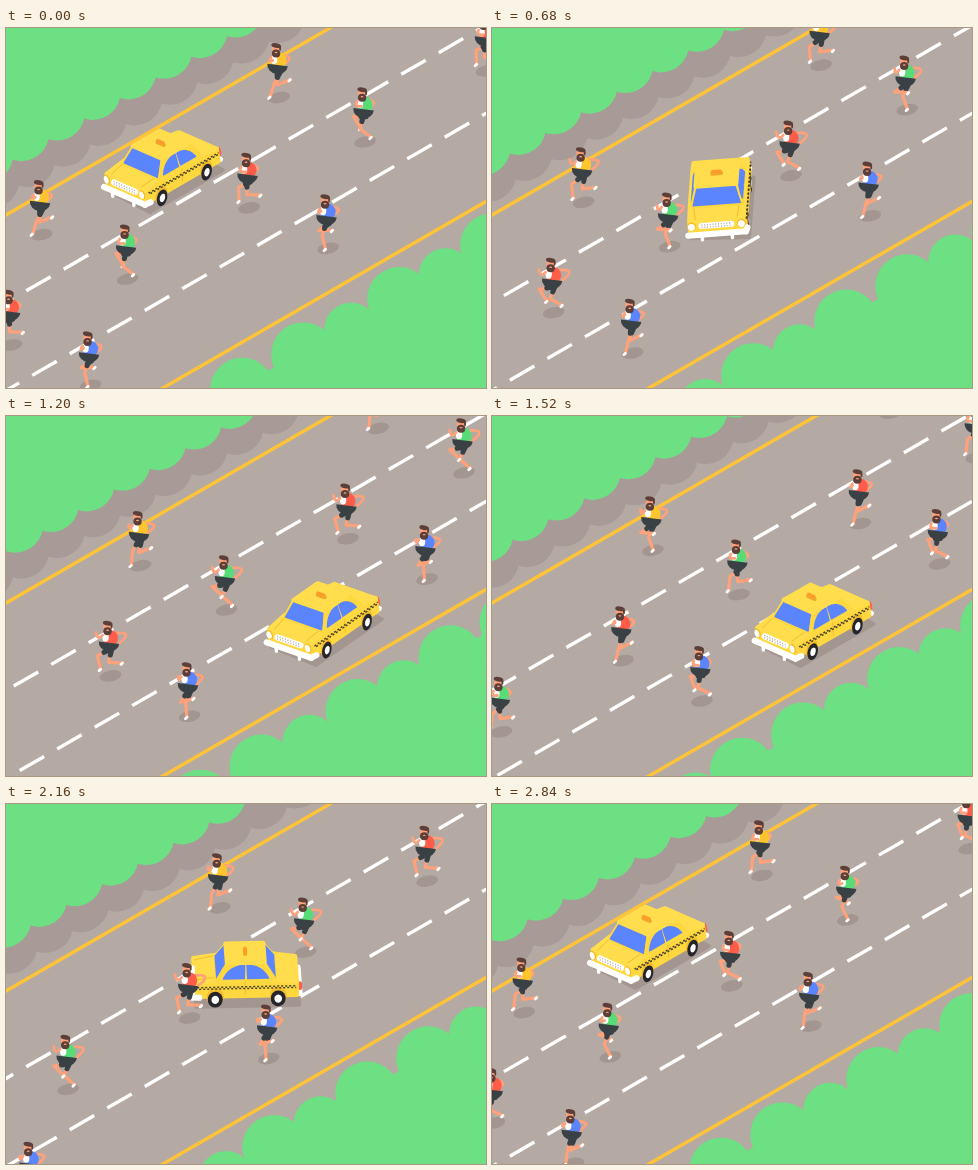
An HTML page with a canvas for the animation above (2.88 s loop, 480 px wide and 360 px high).

```html
<!DOCTYPE html>
<html lang="en">
<head>
<meta charset="utf-8">
<title>Taxi among runners</title>
<style>
  html, body { margin: 0; width: 100%; height: 100%; overflow: hidden; background: #b5a9a3; }
  canvas { display: block; width: 100vw; height: 100vh; }
</style>
</head>
<body>
<canvas id="stage" width="480" height="360"></canvas>
<script>
const ctx = document.getElementById('stage').getContext('2d');
const LOOP = 2880, TAU = Math.PI * 2;
const SLOPE = Math.tan(Math.PI / 6); // isometric ground
const C = {
  road: '#b5a9a3', shade: '#a89a96', bush: '#6ce083', line: '#ffc337', white: '#fff',
  taxi: '#ffd83f', taxiTop: '#ffdd4d', seam: '#f3bd2d', glass: '#5b84ff', dark: '#3a4145',
  skin: '#ffa17a', hair: '#5b3f38', orange: '#ff9a2b', red: '#ff5d49', check: '#4b4229'
};
const mod = (v, n) => ((v % n) + n) % n;
const mix = (a, b, k) => a + (b - a) * k;
const mixPoint = (p, q, k) => p.map((v, i) => mix(v, q[i], k));
const roadY = (x, c) => c - SLOPE * x;

function stroke(points, color, width, cap = 'round') {
  ctx.beginPath();
  points.forEach(p => ctx.lineTo(p[0], p[1]));
  ctx.strokeStyle = color;
  ctx.lineWidth = width;
  ctx.lineCap = cap;
  ctx.lineJoin = 'round';
  ctx.stroke();
}

function fill(points, color, round = 0) {
  if (round) stroke([...points, points[0], points[1]], color, round);
  ctx.beginPath();
  points.forEach(p => ctx.lineTo(p[0], p[1]));
  ctx.fillStyle = color;
  ctx.fill();
}

function oval(x, y, rx, ry, color, turn = 0, from = 0, to = TAU) {
  ctx.beginPath();
  ctx.ellipse(x, y, rx, ry, turn, from, to);
  ctx.fillStyle = color;
  ctx.fill();
}

// Road and bushes

function roadLine(c, color, phase) {
  const dashed = phase !== undefined, stretch = Math.hypot(1, SLOPE);
  const start = dashed ? mod(phase, 37.5) - 75 : -40;
  if (dashed) ctx.setLineDash([24.5 * stretch, 13 * stretch]);
  stroke([[start, roadY(start, c)], [560, roadY(560, c)]], color, 3.4, 'butt');
  ctx.setLineDash([]);
}

function bumps(x0, shift, period, c, r, color) {
  for (let x = mod(x0 + shift, period) - period; x < 760; x += period) oval(x, roadY(x, c), r, r, color);
}

function bank(c, edgeY, color) {
  fill([[-60, roadY(-60, c)], [560, roadY(560, c)], [560, edgeY], [-60, edgeY]], color);
}

function topBush(shift, dx, dy, color) {
  ctx.save();
  ctx.translate(dx, dy);
  bank(112, -400, color);
  bumps(15, shift, 250 / 7, 114, 28, color);
  ctx.restore();
}

function lowBush(shift) {
  const period = 250, crowns = [236, 297, 393];
  bank(494, 500, C.bush);
  crowns.forEach((x, i) => {
    const next = i < 2 ? crowns[i + 1] : crowns[0] + period;
    bumps(x, shift, period, 498, 32, C.bush);
    if (next - x > 70) bumps((x + next) / 2, shift, period, 501, 27, C.bush);
  });
}

// Runners

const runners = [
  { x: 270, c: 178, color: '#ffc52e', phase: 0.75 },
  { x: 356, c: 272, color: '#58dc77', phase: 0.25 },
  { x: 240, c: 271, color: C.red, phase: 0.5 },
  { x: 319, c: 357, color: C.glass, phase: 0 }
];

// The foot runs round an ellipse; the knee follows from the two bone lengths
function leg(hipX, step) {
  const a = step * Math.PI, hipY = 23, thigh = 12.5, shin = 14;
  const dx = 4 + 11.5 * Math.cos(a - 1.9) - hipX, dy = 39 + 10 * Math.cos(a + 0.3) - hipY;
  const d = Math.min(Math.hypot(dx, dy), thigh + shin - 0.1), dir = Math.atan2(dy, dx);
  const bend = Math.acos((thigh ** 2 + d ** 2 - shin ** 2) / (2 * thigh * d));
  const reach = (len, angle) => [hipX + len * Math.cos(angle), hipY + len * Math.sin(angle)];
  const knee = reach(thigh, dir + bend), foot = reach(d, dir);
  stroke([reach(0, 0), knee, foot], C.skin, 3.2);
  stroke([reach(0, 0), mixPoint(reach(0, 0), knee, 0.4)], C.dark, 5);
  stroke([foot, [foot[0] - 1.5, foot[1] + 1.5]], C.white, 2.8);
}

function arm(from, elbow, hand, color) {
  ctx.beginPath();
  ctx.moveTo(...from);
  ctx.quadraticCurveTo(...elbow, ...hand);
  ctx.strokeStyle = color;
  ctx.lineWidth = 2.8;
  ctx.lineCap = 'round';
  ctx.stroke();
}

function drawRunner(x, y, color, step) {
  const out = 0.5 - 0.5 * Math.cos((step - 0.4) * Math.PI);
  ctx.save();
  ctx.translate(x, y);
  oval(3, 47.5, 11, 5.5, '#a39590', -0.2);
  ctx.translate(0, -1.2 * Math.sin(step * Math.PI) ** 2);
  leg(4, step + 1);
  leg(1, step);
  arm([8, 6], mixPoint([16, 10], [27, 4], out), mixPoint([5, 14], [12, 16], out), C.skin);
  oval(3, 11, 7.5, 8, color);
  oval(-2, 10, 3.2, 4.5, C.white);
  oval(1.5, 15.5, 10.3, 9, C.dark, 0.12, 0, Math.PI);
  arm([-5, 8], mixPoint([-8, 13], [-10, 14], out), mixPoint([0, 13], [-12, 5], out), C.skin);
  oval(0, 0, 4.3, 5, C.skin);
  oval(0, 4, 4.2, 4, C.hair);
  oval(0, 3, 1.5, 0.7, C.skin);
  oval(0, -4, 4.8, 2.3, C.hair, 0.2);
  oval(4, -1.5, 1, 3, C.hair);
  ctx.restore();
}

// Taxi: a = forward, b = towards the near side, z = up

function taxiPose(t) {
  const half = LOOP / 2, k = (t % half) / half, away = t < half;
  const rise = v => 2 ** 1.7 * v ** 2.7;
  const ease = k < 0.5 ? rise(k) : 1 - rise(1 - k);
  const pos = away ? ease : 1 - ease;
  const swing = Math.sin(Math.PI * k) ** 3 * (away ? 43 : -43);
  return { x: 157 + 165 * pos, y: 151 + 66 * pos, turn: (45 + swing) * Math.PI / 180 };
}

function drawTaxi({ x, y, turn }) {
  const cos = Math.cos(turn), sin = Math.sin(turn), lean = 0.1;
  const at = ([a, b, z]) => {
    const side = b - z * lean, up = z + b * lean;
    return [x - a * cos + side * sin, y + (a * sin + side * cos) * SLOPE - up];
  };
  const face = (list, color, round) => fill(list.map(at), color, round);
  const line = (list, color, width, cap) => stroke(list.map(at), color, width, cap);
  const across = (a, b, z, color, width, cap) => line([[a, -b, z], [a, b, z]], color, width, cap);
  const disc = (place, r, color) => face(Array.from({ length: 20 }, (_, i) =>
    place(r * Math.cos(i / 20 * TAU), r * Math.sin(i / 20 * TAU))), color);
  const towardsViewer = list => {
    const [p, q, r] = list.map(at);
    return (q[0] - p[0]) * (r[1] - p[1]) < (q[1] - p[1]) * (r[0] - p[0]);
  };
  const dotted = (dash, offset, drawLine) => {
    ctx.setLineDash(dash);
    ctx.lineDashOffset = offset;
    drawLine();
    ctx.setLineDash([]);
  };

  const wide = 27, profile = [[51, 17], [27, 20], [-27, 20], [-51, 17]];
  const edge = b => profile.map(([a, z]) => [a, b, z]);
  const near = edge(wide), far = edge(-wide);

  face([[50, -wide, 0], [50, 31, -3], [-53, 31, -3], [-53, -wide, 0]], '#a39590', 4);
  across(-54, 28, 6, C.white, 5);
  line([[-54, 26, 15], [-54, 27, 11]], C.red, 4);

  // Lower body: front, near side, then the three top panels
  face([far[0], near[0], [51, 28, 5], [51, -wide, 5]], C.taxi, 4);
  face([...near, [-51, 28, 5], [51, 28, 5]], C.taxi, 4);
  for (let i = 0; i < 3; i++) face([near[i], near[i + 1], far[i + 1], far[i]], C.taxiTop, 4);
  for (const b of [-21, 21]) line([[50, b, 18], [29, b * 1.1, 21]], C.seam, 1);

  for (const a of [31, -32]) {
    const rings = [[8.5, C.seam, 5], [7.5, '#25262b', 3], [3.8, C.white, 3]];
    rings.forEach(([r, color, z], i) => disc((u, v) => [a + u, 29.5 + i * 0.5, z + v], r, color));
  }

  // Checked stripe and door seam
  line([[1, 29.5, 7], [1, 29.5, 19]], C.seam, 1);
  for (const row of [0, 1])
    dotted([2, 2], row * 2, () => line([[49, 30, 14.6 - row * 1.6], [-50, 30, 14.6 - row * 1.6]], C.check, 1.5, 'butt'));

  // Grille, lamps and bumper
  across(53, 15, 13, C.white, 6);
  for (const z of [11.8, 14.2]) dotted([1, 1.8], 0, () => across(53.5, 15, z, '#b5ac98', 1.4, 'butt'));
  for (const side of [-1, 1]) {
    disc((u, v) => [53, side * 25 + u, 13 + v], 4.4, C.seam);
    disc((u, v) => [54, side * 25 + u, 13 + v], 3.5, C.white);
    line([[56, side * 15, 6], [56, side * 15, 1]], C.white, 3.5);
  }
  across(54, 29, 5, C.white, 6);
  line([[54, 29, 5], [47, 30, 5]], C.white, 6);

  // Cabin: four sloping walls with glass, each drawn when it faces the viewer
  const corner = (front, side, up) =>
    [mix(front * 30, front * 19, up), mix(side * 26, side * 20.5, up), mix(19, 33, up)];
  const screen = [[0.04, 0.08], [0.96, 0.08], [0.95, 0.9], [0.05, 0.9]];
  const arch = Array.from({ length: 7 }, (_, i) => i / 6 * Math.PI / 2)
    .map(v => [0.47 - 0.36 * Math.cos(v) ** 0.8, 0.1 + 0.74 * Math.sin(v) ** 0.8]);
  const frontPane = [...arch, [0.47, 0.1]];
  const rearPane = frontPane.map(([u, v]) => [1 - u, v]);
  const wall = (from, to, panes) => {
    const quad = [corner(...from, 0), corner(...to, 0), corner(...to, 1), corner(...from, 1)];
    if (!towardsViewer(quad)) return;
    face(quad, C.taxi, 2);
    for (const pane of panes)
      face(pane.map(([u, v]) => mixPoint(mixPoint(quad[0], quad[1], u), mixPoint(quad[3], quad[2], u), v)), C.glass, 1.5);
  };
  wall([-1, 1], [-1, -1], [screen]);
  wall([-1, -1], [1, -1], [frontPane, rearPane]);
  wall([1, -1], [1, 1], [screen]);
  wall([1, 1], [-1, 1], [frontPane, rearPane]);
  face([[1, -1], [1, 1], [-1, 1], [-1, -1]].map(([front, side]) => corner(front, side, 1)), C.taxiTop, 4);

  across(0, 4.5, 34, '#f0a52b', 4);
  across(0, 4, 36, C.orange, 3);
}

function draw(t) {
  const turn = t / LOOP, bushShift = 500 * turn, dashShift = 600 * turn;
  ctx.fillStyle = C.road;
  ctx.fillRect(0, 0, 480, 360);
  topBush(bushShift, 6, 26, C.shade);
  topBush(bushShift, 0, 0, C.bush);
  roadLine(187, C.line);
  roadLine(450.6, C.line);
  roadLine(274.5, C.white, 20 + dashShift);
  roadLine(362.5, C.white, 26 + dashShift);
  lowBush(bushShift);

  const taxi = taxiPose(t);
  const items = [{ depth: taxi.y, draw: () => drawTaxi(taxi) }];
  for (const { x: x0, c, color, phase } of runners)
    for (let k = -2; k < 2; k++) {
      const x = x0 + 237.5 * (turn + k), y = roadY(x, c);
      if (x > -40 && x < 520) items.push({ depth: y + 47, draw: () => drawRunner(x, y, color, phase + t / 240) });
    }
  items.sort((a, b) => a.depth - b.depth).forEach(item => item.draw());
}

const begin = performance.now();
function tick() {
  draw((performance.now() - begin) % LOOP);
  requestAnimationFrame(tick);
}
tick();
</script>
</body>
</html>
```
